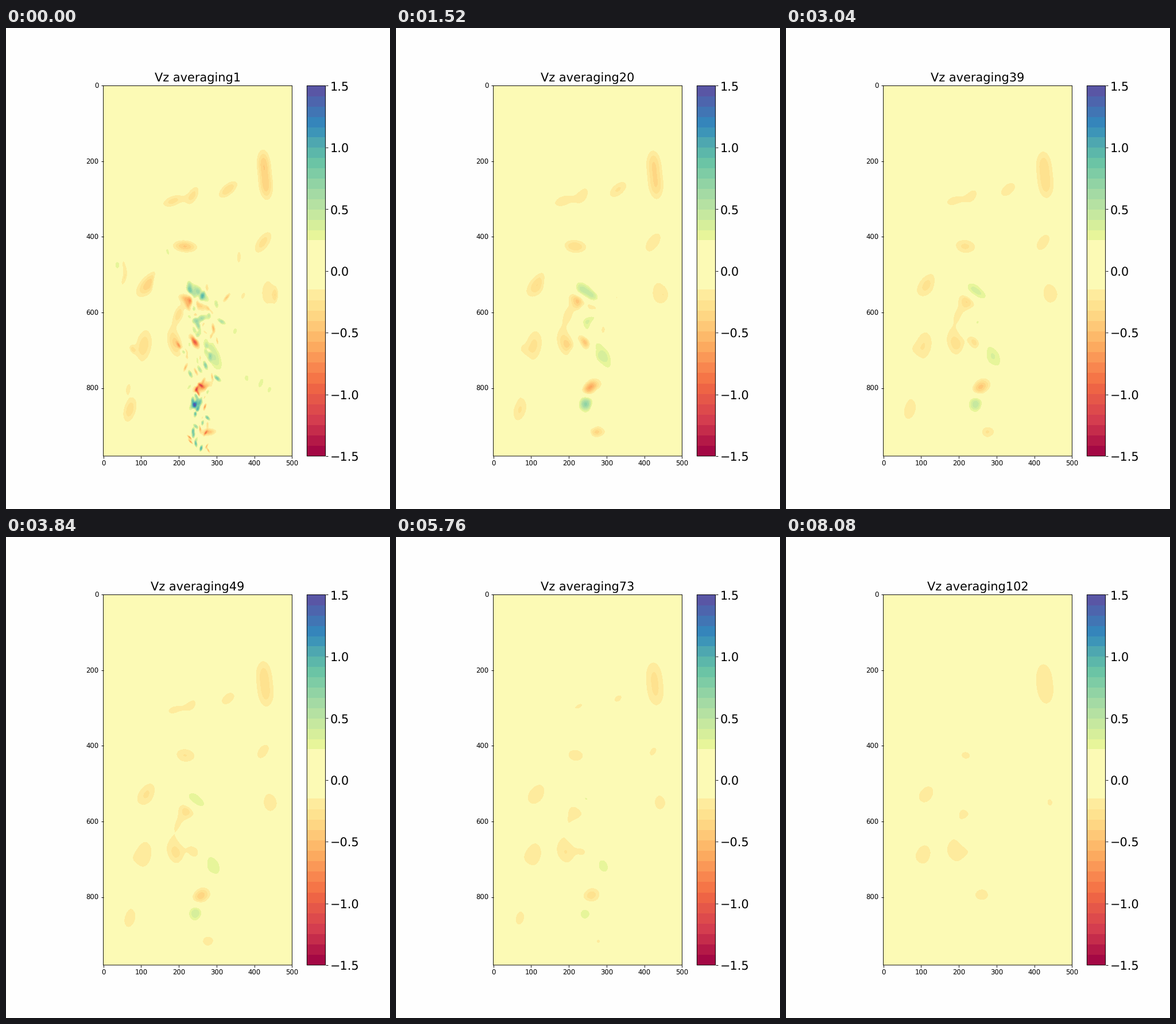
A matplotlib script for the animation above (8.16 s loop, 669 by 837 pixels).

```python
import numpy as np
import matplotlib.pyplot as plt
from matplotlib.animation import FuncAnimation
from matplotlib.cm import ScalarMappable
from matplotlib.colors import BoundaryNorm, ListedColormap

W, H, DPI = 669, 837, 83.7
FRAMES, STEP_MS = 102, 80
LEFT, TOP, SCALE = 169.7, 100.4, 0.6576   # stage position of the plot, px per unit
GRID = 1.5                                # sampling step, px
SPREAD = 1.6                              # variance one averaging pass adds, px^2
LOW, HIGH = -0.15, 0.25                   # range drawn in the plain ground colour

plt.rcParams.update({"path.snap": False, "text.hinting": "none"})

# Main eddies: x, y, visible half length, angle, peak velocity
EDDIES = [
    (449, 235, 24, 86, -.36), (453, 275, 25, 86, -.36), (387, 281, 20, -40, -.32),
    (291, 301, 18, -20, -.28), (326, 291, 16, -65, -.26), (312, 380, 22, 5, -.42),
    (448, 373, 21, -55, -.28), (250, 445, 30, -45, -.40), (315, 471, 15, 20, -.45),
    (336, 482, 18, 20, -.40), (301, 498, 17, -70, -.30), (240, 553, 28, -80, -.30),
    (294, 548, 25, 75, -.35), (329, 546, 17, 55, -1.1), (342, 625, 19, -20, -.62),
    (216, 664, 22, -75, -.30), (353, 703, 14, -5, -.50), (456, 460, 20, 92, -.22),
    (338, 462, 21, 45, .68), (338, 506, 15, -15, .65), (360, 568, 28, 65, .45),
    (333, 653, 17, -40, 1.3),
]

xs = np.arange(LEFT, LEFT + 500 * SCALE + GRID, GRID)
ys = np.arange(TOP, TOP + 980 * SCALE + GRID, GRID)


def spot(x, y, length, width, angle, peak):
    """Tilted Gaussian; length and width are standard deviations."""
    dx, dy = xs[None, :] - x, ys[:, None] - y
    c, s = np.cos(np.radians(angle)), np.sin(np.radians(angle))
    u, v = (dx * c + dy * s) / length, (dy * c - dx * s) / width
    return peak * np.exp(-(u * u + v * v) / 2)


def eddy(x, y, reach, angle, peak):
    """Spot whose first contour lies at the given half length."""
    floor, ratio = (HIGH, 0.38) if peak > 0 else (LOW, 0.5)
    length = reach / np.sqrt(2 * np.log(peak / floor))
    return spot(x, y, length, ratio * length, angle, peak)


def jet(rng, count=76):
    """Small streaks of alternating sign, finer and stronger towards the nozzle."""
    total = 0
    for i, t in enumerate(np.linspace(0, 1, count)):
        length = 7 - 3.5 * t
        total += spot(335 + rng.normal() * (23 - 15 * t), 450 + 285 * t,
                      length, 0.38 * length, rng.uniform(30, 130),
                      (-1) ** i * rng.uniform(0.25, 0.45 + 0.6 * t))
    return total


def wisps(rng, count=16):
    """Faint upright streaks in the calm flow around the jet."""
    total = 0
    for i in range(count):
        side = (-1) ** (i // 2)
        total += spot(330 + side * rng.uniform(45, 140), rng.uniform(340, 640),
                      rng.uniform(6, 12), 4, rng.uniform(60, 120),
                      rng.uniform(0.28, 0.34) if i % 2 else -0.22)
    return total


rng = np.random.default_rng(4)
start = sum(eddy(*e) for e in EDDIES) + jet(rng) + wisps(rng)
spectrum = np.fft.rfft2(start)
kx = 2 * np.pi * np.fft.rfftfreq(len(xs), GRID)
ky = 2 * np.pi * np.fft.fftfreq(len(ys), GRID)
decay = SPREAD / 2 * (kx[None, :] ** 2 + ky[:, None] ** 2)


def field(n):
    """Velocity after n averaging passes."""
    return np.clip(np.fft.irfft2(spectrum * np.exp(-n * decay), s=start.shape),
                   -1.49, 1.49)


edges = np.concatenate([np.linspace(-1.5, LOW, 17), np.linspace(HIGH, 1.5, 16)])
colors = plt.get_cmap("Spectral")((edges[1:] + edges[:-1]) / 6 + 0.5)
colors[16, :3] = np.array([252, 250, 181]) / 255
cmap = ListedColormap(colors)
norm = BoundaryNorm(edges, cmap.N)

fig, ax = plt.subplots(figsize=((W + 1e-4) / DPI, (H + 1e-4) / DPI), dpi=DPI,
                       facecolor="#fefefe")
bar = fig.colorbar(ScalarMappable(norm, cmap), ax=ax, spacing="proportional",
                   ticks=np.arange(-1.5, 1.6, 0.5))
bar.minorticks_off()
bar.ax.tick_params(labelsize=18)
ax.set_aspect("equal")
ax.set_xlim(0, 500)
ax.set_ylim(980, 0)
ax.set_xticks(range(0, 501, 100))
ax.set_yticks(range(0, 801, 200))
ax.set_facecolor(colors[16])
title = ax.set_title("", fontsize=18)
layer = None


def draw(n):
    global layer
    if layer is not None:
        layer.remove()
    layer = ax.contourf((xs - LEFT) / SCALE, (ys - TOP) / SCALE, field(n),
                        levels=edges, cmap=cmap, norm=norm)
    title.set_text(f"Vz averaging{n + 1}")
    return layer, title


anim = FuncAnimation(fig, draw, frames=FRAMES, init_func=lambda: (title,),
                     interval=STEP_MS, repeat=True, repeat_delay=0)
plt.show()
```
